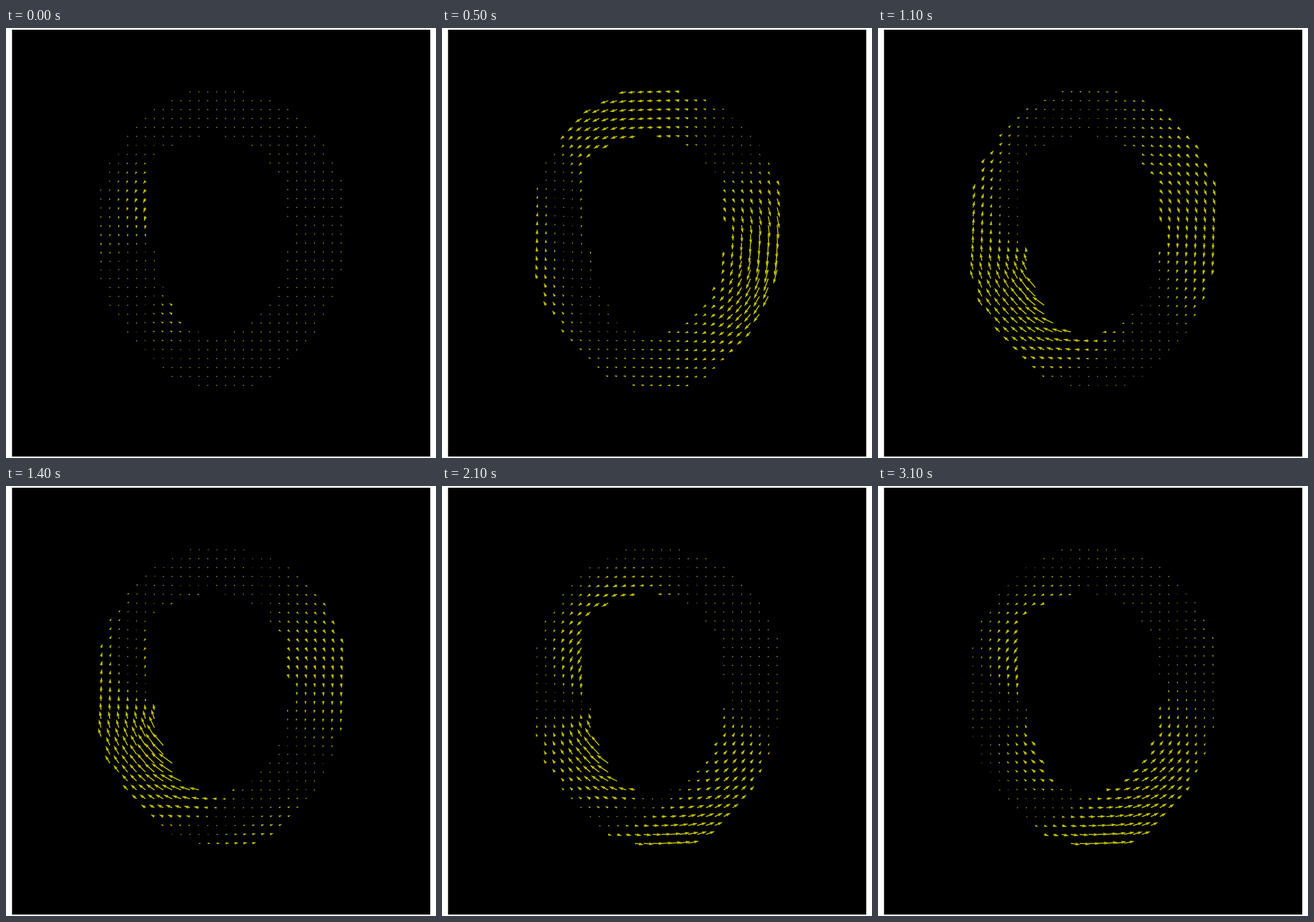
These frames come from a looping animation (748 by 748 pixels, 3200 ms). An HTML page with a canvas:

```html
<!DOCTYPE html>
<html lang="en">
<head>
<meta charset="utf-8">
<title>Ring flow</title>
<style>
  html, body { margin: 0; width: 100%; height: 100%; overflow: hidden; background: #fff; }
  canvas { display: block; width: 748px; height: 748px; }
</style>
</head>
<body>
<canvas id="stage" width="748" height="748"></canvas>
<script>
const ctx = document.getElementById('stage').getContext('2d');
const LOOP = 3200, STEP = 100;
const PITCH = 15.47, LEFT = 165.3, TOP = 111;
const CENTER = { x: 374, y: 366 };
const WIDTH = 1.75;

// Occupied columns per row, and the open middle of the rows from HOLE_ROW on.
const run = (value, count) => Array(count).fill(value);
const first = [10, 8, 6, 5, 4, 3, 3, 2, 1, 1, 1, ...run(0, 11), 1, 1, 1, 2, 3, 3, 4, 5, 6, 7, 8, 11];
const last = [16, 19, 21, 22, 23, 24, 25, 25, 26, 26, ...run(27, 11), 26, 26, 26, 25, 25, 24, 24, 23, 22, 21, 20, 19, 17];
const HOLE_ROW = 5;
const holeStart = [11, 8, 6, ...run(5, 10), ...run(6, 4), 7, 7, 8, 8, 9, 11];
const holeEnd = [14, 17, 19, 19, 20, ...run(21, 5), ...run(22, 3), ...run(21, 4), 20, 20, 19, 18, 17, 15];

// Clockwise speed at every 30 degrees, from the right, on both rims.
const poses = [
  { time: 500,
    inner: [11, 9, 6.5, 5, 1, -3, -5, -7, -11, -10, -2, 9],
    outer: [27, 20, 7, 6, 5, 9, 9, 2, -14, -11, -3, 7] },
  { time: 1100,
    inner: [9, 3, 3, 10, 25, 21, 2, -5, -4, 1, 6, 11],
    outer: [12, 7, -1, -2, 9, 16, 14, 10, 5, 4, 7, 11] },
  { time: 1700,
    inner: [1.5, 1, -2, 5, 28, 25, 1, -16, -13, -8, -1, 5],
    outer: [6, -1.5, -9, -12, 4, 15, 8, 0, -2, -1, -2, 5] },
  { time: 2100,
    inner: [-2, -8, -6, 1, 24, 18, -5, -19, -18, -8, -1, -1],
    outer: [1, -6, -13, -20, 0, 8, 1, -4, -3, -1, -1, -1] },
  { time: 2500,
    inner: [-2, -9, -10, -2, 11, 5, -10, -21, -18, -7, -1.5, -1],
    outer: [2, -5, -15, -22, -3, 5, 1, -4, -2, -1, -1.5, 4] },
  { time: 3100,
    inner: [-5, -9, -12, -6, 11, 8, -5, -16, -12, -3, -1, -1.5],
    outer: [-3, -6, -12, -20, -3, 2, 0, -4, -2, -1, -1, -4] }
];

const bump = (x, mid, spread) => Math.exp(-(((x - mid) / spread) ** 2));
const mix = (a, b, k) => a + (b - a) * k;

function hermite(a, b, slopeA, slopeB, k) {
  const k2 = k * k, k3 = k2 * k;
  return a * (2 * k3 - 3 * k2 + 1) + slopeA * (k3 - 2 * k2 + k) +
         b * (3 * k2 - 2 * k3) + slopeB * (k3 - k2);
}

function around(list, degrees) {
  const n = list.length, pos = degrees * n / 360, i = Math.floor(pos);
  const at = k => list[(i + k + n) % n];
  return hermite(at(0), at(1), (at(1) - at(-1)) / 2, (at(2) - at(0)) / 2, pos - i);
}

function startSpeed(angle, depth) {
  const rim = -11.5 * bump(angle, 206, 26) + 7 * bump(angle, 122, 17);
  return rim * (1 - 0.75 * depth) - 4 * depth * bump(angle, 176, 14);
}

function poseSpeed(pose, angle, depth) {
  const swell = 1 + 1.8 * depth * (1 - depth) * bump(angle, 50, 30);
  return mix(around(pose.inner, angle), around(pose.outer, angle), depth) * swell;
}

function makePoint(col, row) {
  const x = LEFT + col * PITCH, y = TOP + row * PITCH;
  const dx = x - CENTER.x, dy = y - CENTER.y, r = Math.hypot(dx, dy);
  const innerR = r / Math.hypot(dx / 125, dy / 170);
  const outerR = r / Math.hypot(dx / 209, dy / 258);
  const depth = Math.min(1, Math.max(0, (r - innerR) / (outerR - innerR)));
  const angle = (Math.atan2(dy, dx) * 180 / Math.PI + 360) % 360;
  const keys = [{ time: 0, speed: startSpeed(angle, depth) }];
  for (const pose of poses) keys.push({ time: pose.time, speed: poseSpeed(pose, angle, depth) });
  return { x, y, keys, heading: Math.atan2(dx, -dy) };
}

const points = [];
first.forEach((start, row) => {
  const h = row - HOLE_ROW;
  for (let col = start; col <= last[row]; col++) {
    if (!(col > holeStart[h] && col < holeEnd[h])) points.push(makePoint(col, row));
  }
});

function slopeAt(keys, i) {
  if (i === 0 || i === keys.length - 1) return 0;
  const a = keys[i - 1], b = keys[i + 1];
  return (b.speed - a.speed) / (b.time - a.time);
}

function speedAt(keys, time) {
  let i = 0;
  while (i < keys.length - 2 && keys[i + 1].time <= time) i++;
  const a = keys[i], b = keys[i + 1], span = b.time - a.time;
  if (i === 0) return mix(a.speed, b.speed, time / span);
  return hermite(a.speed, b.speed, slopeAt(keys, i) * span, slopeAt(keys, i + 1) * span, (time - a.time) / span);
}

// Arrows shorter than a full head shrink as a whole; the shortest become dots.
function addArrow(x, y, heading, length) {
  const size = Math.abs(length) / WIDTH;
  if (size < 1) {
    ctx.moveTo(x + WIDTH / 2, y);
    ctx.arc(x, y, WIDTH / 2, 0, Math.PI * 2);
    return;
  }
  const unit = WIDTH * Math.min(1, size / 5);
  const tip = Math.abs(length);
  const neck = tip - 4.5 * unit, barb = tip - 5 * unit;
  const turn = length < 0 ? heading + Math.PI : heading;
  const c = Math.cos(turn), s = Math.sin(turn);
  const shape = [[0, 0.5], [neck, 0.5], [barb, 1.5], [tip, 0], [barb, -1.5], [neck, -0.5], [0, -0.5]];
  shape.forEach(([along, side], i) => {
    const across = side * unit;
    const px = x + along * c - across * s, py = y + along * s + across * c;
    if (i) ctx.lineTo(px, py); else ctx.moveTo(px, py);
  });
  ctx.closePath();
}

function draw(time) {
  ctx.fillStyle = '#fff';
  ctx.fillRect(0, 0, 748, 748);
  ctx.fillStyle = '#000';
  ctx.fillRect(10.5, 3, 727.5, 742.5);
  ctx.fillStyle = '#bfbf00';
  for (const p of points) {
    ctx.beginPath();
    addArrow(p.x, p.y, p.heading, speedAt(p.keys, time));
    ctx.fill();
  }
}

let shown = -1;
function tick() {
  const time = Math.floor(performance.now() % LOOP / STEP) * STEP;
  if (time !== shown) draw(shown = time);
  requestAnimationFrame(tick);
}
tick();
</script>
</body>
</html>
```
